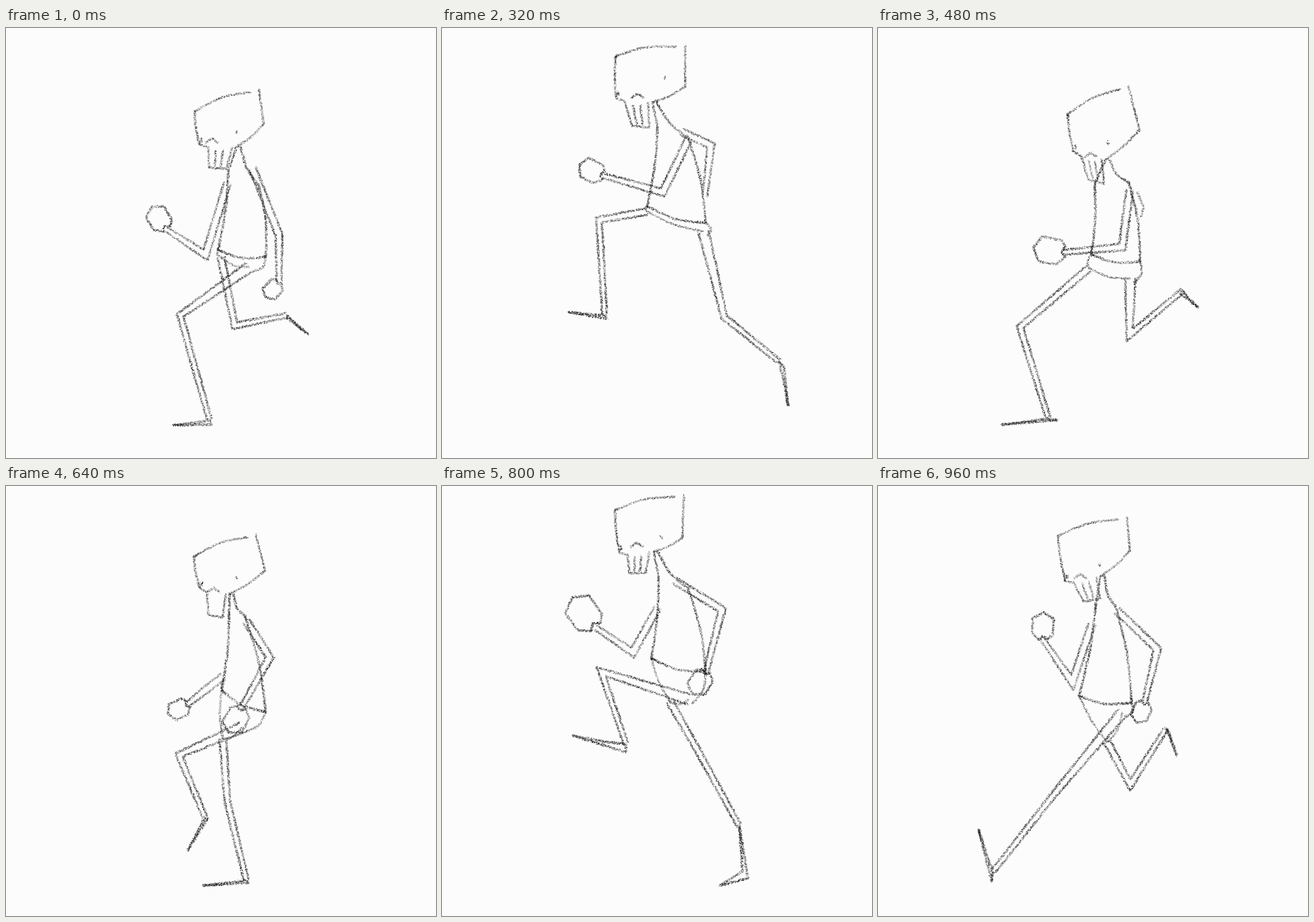
Animation of 748x748 px, one loop 1.04 s. Source, as an HTML page with a canvas:

```html
<!DOCTYPE html>
<html lang="en">
<head>
<meta charset="utf-8">
<title>Pencil run cycle</title>
<style>
html, body { margin: 0; width: 100%; height: 100%; overflow: hidden; background: #fcfcfc; }
canvas { display: block; }
</style>
</head>
<body>
<canvas id="stage" width="748" height="748"></canvas>
<script>
// Key poses of the rig, one row per pose, as x y pairs.

// top left, top right, back, neck, cheek, jaw
const head = [
  [328, 145, 440, 106, 448, 167, 401, 207, 337, 203, 353, 243],
  [304, 87, 421, 40, 436, 102, 376, 135, 325, 153, 348, 187],
  [302, 49, 423, 30, 423, 102, 366, 129, 303, 122, 330, 170],
  [330, 150, 435, 100, 455, 177, 396, 229, 340, 215, 366, 264],
  [327, 123, 434, 84, 451, 147, 389, 188, 337, 178, 352, 224],
  [301, 42, 421, 15, 418, 90, 368, 114, 309, 116, 326, 152],
  [313, 87, 433, 54, 438, 113, 387, 157, 326, 166, 357, 201]
];
// nose, ear, pressure of the teeth
const features = [
  [358, 192, 401, 181, 5], [342, 117, 379, 106, 4], [340, 114, 388, 87, 5], [370, 217, 400, 200, 4],
  [361, 177, 401, 160, 0], [339, 98, 382, 89, 6], [352, 153, 386, 138, 4]
];
// collar, belly, shoulder, rump
const torso = [
  [387, 247, 369, 386, 440, 274, 452, 398],
  [381, 180, 374, 332, 424, 190, 460, 358],
  [375, 172, 357, 310, 428, 190, 459, 339],
  [377, 271, 371, 394, 436, 268, 456, 406],
  [388, 220, 375, 355, 416, 226, 452, 393],
  [377, 157, 364, 300, 428, 178, 459, 323],
  [379, 205, 350, 365, 414, 210, 441, 377]
];
// shoulder, elbow, wrist, knuckles
const farArm = [
  [385, 270, 347, 395, 279, 350, 252, 312],
  [434, 200, 483, 291, 460, 345, 460, 345],
  [417, 181, 468, 204, 457, 294, 457, 294],
  [446, 288, 456, 314, 453, 328, 453, 328],
  [377, 332, 347, 355, 317, 379, 283, 399],
  [375, 212, 332, 290, 267, 246, 224, 196],
  [372, 240, 338, 342, 287, 267, 286, 220]
];
const nearArm = [
  [429, 245, 475, 360, 475, 441, 453, 470],
  [423, 194, 437, 308, 328, 311, 283, 302],
  [429, 193, 384, 286, 281, 257, 238, 240],
  [438, 282, 425, 381, 326, 390, 270, 385],
  [418, 235, 459, 298, 410, 385, 390, 430],
  [405, 165, 487, 215, 460, 322, 438, 363],
  [416, 217, 486, 284, 464, 375, 452, 412]
];
// hip, knee, ankle, heel, toe
const farLeg = [
  [374, 399, 398, 518, 488, 500, 489, 505, 525, 532],
  [371, 340, 303, 371, 352, 505, 357, 508, 333, 555],
  [357, 319, 273, 334, 283, 500, 287, 506, 220, 494],
  [367, 418, 247, 520, 296, 679, 311, 682, 215, 690],
  [377, 440, 385, 548, 418, 686, 423, 690, 343, 695],
  [397, 376, 442, 455, 517, 591, 532, 682, 484, 695],
  [399, 446, 439, 520, 501, 422, 505, 426, 520, 469]
];
const nearLeg = [
  [423, 416, 303, 500, 354, 682, 358, 690, 291, 691],
  [445, 371, 453, 531, 524, 655, 522, 686, 473, 696],
  [455, 354, 491, 503, 586, 580, 595, 590, 602, 657],
  [439, 436, 438, 534, 531, 456, 525, 461, 556, 486],
  [410, 420, 301, 468, 346, 576, 351, 579, 316, 634],
  [429, 371, 277, 323, 320, 449, 320, 463, 227, 434],
  [425, 394, 305, 538, 200, 671, 198, 688, 175, 597]
];

const STEP = 80, STEPS = 13;
const ctx = document.getElementById('stage').getContext('2d');
let rand;

const add = ([x, y], dx, dy) => [x + dx, y + dy];
const mix = (a, b, t) => [a[0] + (b[0] - a[0]) * t, a[1] + (b[1] - a[1]) * t];
const dist = (a, b) => Math.hypot(b[0] - a[0], b[1] - a[1]);
const normal = (a, b) => {
  const d = dist(a, b) || 1;
  return [(a[1] - b[1]) / d, (b[0] - a[0]) / d];
};

// Catmull-Rom, used both along a curve and between key poses
const spline = (a, b, c, d, t) =>
  b + t / 2 * (c - a + t * (2 * a - 5 * b + 4 * c - d + t * (3 * (b - c) + d - a)));

function pose(keys, step) {
  const k = step >> 1, t = step % 2 / 2, n = keys.length;
  const [a, b, c, d] = [-1, 0, 1, 2].map(i => keys[(k + i + n) % n]);
  return b.map((v, i) => spline(a[i], v, c[i], d[i], t));
}

const points = (keys, step) => {
  const v = pose(keys, step), out = [];
  for (let i = 0; i < v.length; i += 2) out.push([v[i], v[i + 1]]);
  return out;
};

function seeded(seed) {
  return () => {
    seed = (seed + 0x6D2B79F5) | 0;
    let x = Math.imul(seed ^ seed >>> 15, 1 | seed);
    x ^= x + Math.imul(x ^ x >>> 7, 61 | x);
    return ((x ^ x >>> 14) >>> 0) / 4294967296;
  };
}

// Scatter pencil grain along the stroke
function pencil(pressure, pts, smooth) {
  const last = pts.length - 1, phase = rand() * 6, width = 3.2 + pressure * .22;
  const at = i => pts[Math.max(0, Math.min(last, i))];
  let run = 0;
  for (let i = 0; i < last; i++) {
    const count = Math.max(2, Math.ceil(dist(at(i), at(i + 1))));
    for (let n = 0; n < count; n++, run++) {
      const t = n / count;
      const [x, y] = smooth
        ? [0, 1].map(k => spline(at(i - 1)[k], at(i)[k], at(i + 1)[k], at(i + 2)[k], t))
        : mix(at(i), at(i + 1), t);
      const tone = pressure * .13 * (.85 + .2 * Math.sin(run / 17 + phase));
      for (let g = 0; g < 3; g++) {
        const angle = rand() * 2 * Math.PI, r = Math.sqrt(rand()) * width / 2;
        ctx.globalAlpha = Math.min(1, tone * rand());
        ctx.fillRect(x + r * Math.cos(angle) - .7, y + r * Math.sin(angle) - .7, 1.4, 1.4);
      }
    }
  }
}

function arc(pressure, a, b, bulge) {
  const n = normal(a, b);
  pencil(pressure, [a, add(mix(a, b, .5), n[0] * bulge, n[1] * bulge), b], true);
}

// Two mitred edges around a jointed limb
function limb(pressure, joints, widths) {
  for (const side of [-1, 1]) {
    pencil(pressure, joints.map((p, i) => {
      const n = normal(joints[Math.max(0, i - 1)], joints[Math.max(1, i)]);
      const m = i && i < joints.length - 1 ? normal(p, joints[i + 1]) : n;
      const k = side * widths[i] / Math.max(.3, 1 + n[0] * m[0] + n[1] * m[1]);
      return add(p, (n[0] + m[0]) * k, (n[1] + m[1]) * k);
    }));
  }
}

function arm([shoulder, elbow, wrist, knuckles], pressure) {
  limb(pressure, [shoulder, elbow, wrist], [6, 6, 4]);
  const size = dist(wrist, knuckles);
  if (size < 8) return;
  const n = normal(wrist, knuckles);
  const hand = (along, across) =>
    add(mix(wrist, knuckles, along), n[0] * across * size, n[1] * across * size);
  pencil(6, [hand(0, -.15), hand(.25, -.4), hand(.8, -.36), hand(1, .05),
    hand(.75, .42), hand(.15, .36), hand(0, .15)]);
  pencil(8, [hand(0, -.15), hand(.12, 0), hand(0, .18)]);
}

function leg([hip, knee, ankle, heel, toe], hipWidth) {
  limb(6, [hip, knee, ankle], [hipWidth, 5, 4]);
  const flat = Math.max(.3, 1 - dist(ankle, heel) / dist(heel, toe));
  pencil(7, [ankle, heel, toe, mix(heel, mix(ankle, toe, .5), flat), ankle]);
}

function skull([topL, topR, back, neck, cheek, jaw], [noseX, noseY, earX, earY, teeth]) {
  arc(5, topL, mix(topL, topR, .87), -7);
  arc(6, topL, cheek, 2);
  pencil(5, [topR, back]);
  arc(5, back, neck, -3);
  pencil(8, [add(cheek, 3, -11), add(cheek, 3, -4)]);
  pencil(7, [[earX - 1, earY - 2], [earX + 1, earY + 2]]);
  pencil(5, [[noseX - 11, noseY + 8], [noseX, noseY], [noseX + 11, noseY + 8]]);

  const width = [(neck[0] - cheek[0]) * .48, (neck[1] - cheek[1]) * .48];
  const jawL = add(mix(cheek, neck, .22), 1, 4), jawR = mix(cheek, neck, .88);
  const chin = add(jaw, ...width);
  pencil(5, [cheek, jawL, jaw, chin, jawR]);
  for (const t of [.32, .64]) {
    const root = mix(jaw, chin, t), gum = mix(jawL, jawR, t);
    if (teeth >= 1) pencil(teeth, [mix(gum, root, .15), mix(gum, root, .93)]);
  }
}

function draw(step) {
  rand = seeded(step * 977 + 5);
  ctx.globalAlpha = 1;
  ctx.fillStyle = '#fcfcfc';
  ctx.fillRect(0, 0, 748, 748);
  ctx.fillStyle = '#1a1a1a';

  const skullPts = points(head, step), neck = skullPts[3];
  const [collar, belly, shoulder, rump] = points(torso, step);
  const near = points(nearLeg, step), far = points(farLeg, step);

  skull(skullPts, pose(features, step));
  arm(points(farArm, step), 5);
  leg(far, 6);

  const nape = add(neck, 7, 0);
  pencil(6, [neck, collar]);
  pencil(6, [nape, add(mix(nape, shoulder, .5), -4, 6), shoulder], true);
  arc(7, collar, belly, -4);
  arc(6, shoulder, rump, -6);
  arc(7, belly, rump, 8);
  arc(5, rump, add(near[0], 6, 8), -8);
  arc(4, belly, far[0], 4);
  arc(4, far[0], near[0], 6);

  leg(near, 9);
  arm(points(nearArm, step), 6);
}

let shown = -1;
function tick() {
  const step = Math.floor(performance.now() / STEP) % STEPS;
  if (step !== shown) draw(shown = step);
  requestAnimationFrame(tick);
}
tick();
</script>
</body>
</html>
```
